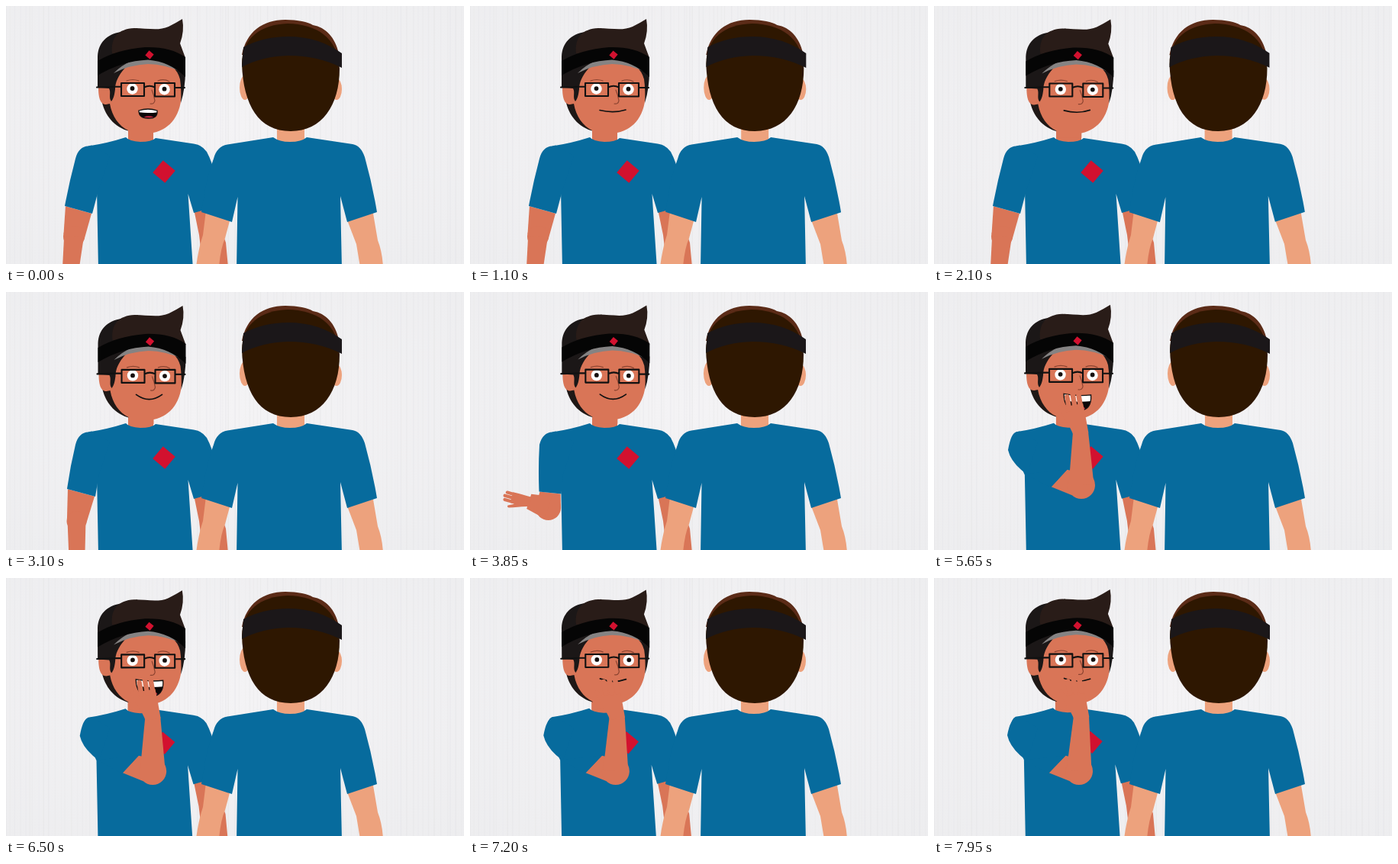
An HTML page for the animation above (8000 ms loop, 600 by 338 pixels).

```html
<!DOCTYPE html>
<html lang="en">
<head>
<meta charset="utf-8">
<title>Two colleagues</title>
<style>
  html, body { margin: 0; width: 100%; height: 100%; overflow: hidden; background: #f0eff1; }
  svg { display: block; width: 100vw; height: 100vh; }
  .shirt { fill: #076b9d; }
  .skin { fill: #d97557; }
  .pale { fill: #eda27d; }
  .line { fill: none; stroke: #111; stroke-linecap: round; }
</style>
</head>
<body>
<svg viewBox="0 0 600 338" preserveAspectRatio="none">
  <defs>
    <radialGradient id="light" cx=".5" cy=".45" r=".75">
      <stop offset="0" stop-color="#f4f3f5"/>
      <stop offset="1" stop-color="#ededef"/>
    </radialGradient>
    <clipPath id="mouthClip"><path id="mouthEdge"/></clipPath>
  </defs>
  <rect width="600" height="338" fill="url(#light)"/>
  <g id="stripes" fill="#d9d9dc"></g>

  <g id="body">
    <path class="skin" d="M246 266L253 300L258 342H291L288 310L271 262Z"/>
    <path class="skin" d="M160 140H193V182H160Z"/>
    <path class="shirt" d="M157 172Q161 177 176 178Q191 178 196 173L246 180.500Q257 182 263 191Q270 204 274 222L278 262L246 271L238.500 246L245 345H121L119 240L101 200Q102 186 108 183.500Q132 180 157 172Z"/>
    <rect x="-10.500" y="-10.500" width="21" height="21" fill="#d2112f" transform="translate(207 217) rotate(40)"/>
  </g>

  <g id="head">
    <path fill="#1f1816" d="M122 108L126 127C131 146 144 161 166 165L175 100Z"/>
    <path class="skin" d="M121 106C121 119 123 129 131 129L136 128C139 145 148 157 160 163V172H193V166C216 161 230 142 230 112L233 84L190 70L140 80L136 106Z"/>
    <path fill="#1b1717" d="M120 66C121 48 132 37 150 34L172 29L190 60L156 81C147 91 143 100 143 109C142 117 141 121 138 125C134 120 138 113 135 108L120 107L120 86Z"/>
    <path fill="#1b1717" d="M218 77L235 84Q235 108 229 127Q230 110 228 96Q225 85 218 80Z"/>
    <path fill="#291c18" d="M139 62C137 41 147 30 168 29C185 29 200 33 213 27Q223 22 231 17Q234 33 228 49L235 68Z"/>
    <path fill="#858383" d="M141 88Q162 67 190 67Q216 69 234 88Q208 76 186 76Q162 77 141 88Z"/>
    <path fill="#050505" d="M120 72Q145 57 182 54Q215 53 235 67L235 93Q215 73 186 70.500Q152 72 120 91Z"/>
    <rect x="-4" y="-4" width="8" height="8" fill="#d2112f" transform="translate(188 64) rotate(40)"/>
    <g class="line" style="stroke:#8c4431" stroke-width="1.200">
      <path d="M158 98Q166 95 174 98M199 98Q207 95 214 99M191 110Q194 117 195 124Q194 129 189 128"/>
    </g>
    <g fill="#fff"><circle cx="165.500" cy="108.500" r="7.200"/><circle cx="207.500" cy="109.200" r="7.200"/></g>
    <g id="pupils" fill="#160f0e"><circle cx="165.500" cy="108.500" r="2.900"/><circle cx="207.500" cy="109.200" r="2.900"/></g>
    <g class="line" stroke-width="2.100" stroke-linejoin="round">
      <path d="M119 106.500L151 105.500M151 101H181V118H151ZM195 101H221V118.500H195ZM181 106.500Q188 103 195 106.500M221 107L234 107"/>
    </g>
    <path id="smile" class="line" stroke-width="1.700"/>
    <g id="open">
      <g clip-path="url(#mouthClip)">
        <rect x="165" y="128" width="45" height="32" fill="#0c0708"/>
        <path id="teeth" fill="#fff"/>
        <ellipse id="tongue" cx="187" fill="#b5233c"/>
      </g>
      <path id="rim" class="line" stroke-width="1.300"/>
    </g>
  </g>

  <g id="arm">
    <path id="upper" class="skin"/>
    <circle id="elbow" class="skin"/>
    <path id="fore" class="skin"/>
    <g id="hand">
      <path class="skin" d="M-10 3C-12 -9 -19 -22 -23 -36Q-23 -40 -19 -39L-13 -27L-12.500 -36H9.500C10 -22 10 -9 10 3Z"/>
      <path d="M-9.500 -32V-48M-1.700 -32V-50M5.800 -32V-47" fill="none" stroke="#d97557" stroke-width="6.500" stroke-linecap="round"/>
    </g>
    <path id="sleeve" class="shirt"/>
  </g>

  <g id="mate">
    <path class="pale" d="M262 268L258 300Q252 318 249 342H279Q281 318 287 304L294 278Z"/>
    <path class="pale" d="M446 278L459 312L464 342H494Q493 322 487 307L480 266Z"/>
    <path class="pale" d="M355 150H391V184H355Z"/>
    <path class="shirt" d="M350 172Q358 178 372 178Q387 178 394 172L454 181Q465 183 470 198Q480 234 486 270L447 283L438 249L440 345H302L303.500 250L296 283L256 270Q262 226 272 200Q276 184 290 181.500Z"/>
    <ellipse class="pale" cx="313" cy="107" rx="7" ry="16"/>
    <ellipse class="pale" cx="433" cy="109" rx="7" ry="14"/>
    <path fill="#5b2b17" d="M309 64C315 34 336 18 366 18C382 18 396 21 402 25C419 28 431 41 436 62Z"/>
    <path fill="#2e1701" d="M309 76C309 42 334 24 369 23C406 24 435 40 437 82C437 130 414 164 373 164C331 164 311 130 309 76Z"/>
    <path fill="#1b1719" d="M311 54Q337 40 370 40Q409 40 440 62V81Q409 65 370 65Q335 66 309 80Z"/>
  </g>
</svg>
<script>
const $ = id => document.getElementById(id);
const LOOP = 8000;
const mix = (a, b, k) => a + (b - a) * k;
const ramp = (t, a, b) => {
  const k = Math.min(1, Math.max(0, (t - a) / (b - a)));
  return k * k * (3 - 2 * k);
};
const set = (id, attrs) => {
  for (const name in attrs) $(id).setAttribute(name, attrs[name]);
};

// shoulder, bend, cuff out, cuff in, elbow, wrist, elbow radius, hand turn, hand size
const rest = [91, 200, 83, 230, 77, 262, 113, 272, 89, 302, 83, 362, 14, -176, 1];
const tucked = [91, 200, 84, 229, 80, 258, 117, 268, 92.5, 300, 93, 362, 13, -176, 1];
const swing = [91, 200, 90, 230, 92, 262, 120, 264, 104, 280, 75, 262, 17, -60, .6];
const lift = [92, 202, 93, 230, 99, 262, 122, 261, 118, 274, 108, 215, 20, -25, .9];
const cheek = [92, 204, 92, 230, 99, 262, 123, 260, 124, 271, 147, 206, 22, 12, 1];
const cover = [97, 207, 103, 234, 153, 256, 175, 232, 193, 253, 192, 183, 18, -10, 1];
const settle = [96, 206, 102, 233, 150, 256, 173, 232, 190, 253, 193, 181, 18, -10, 1];
const moves = [[0, rest], [2700, rest], [3100, tucked], [3500, tucked], [3950, swing], [4300, lift],
  [4550, cheek], [4700, cheek], [5150, cover], [5700, cover], [LOOP, settle]];

function armAt(t) {
  let i = 1;
  while (i < moves.length - 1 && t > moves[i][0]) i++;
  const [t0, a] = moves[i - 1], [t1, b] = moves[i];
  const k = ramp(t, t0, t1);
  return a.map((v, n) => mix(v, b[n], k));
}

// Tapered limb between two points with the given half widths
function limb(x0, y0, w0, x1, y1, w1) {
  const d = Math.hypot(x1 - x0, y1 - y0) || 1;
  const nx = (y0 - y1) / d, ny = (x1 - x0) / d;
  return `M${x0 + nx * w0} ${y0 + ny * w0}L${x1 + nx * w1} ${y1 + ny * w1}` +
    `L${x1 - nx * w1} ${y1 - ny * w1}L${x0 - nx * w0} ${y0 - ny * w0}Z`;
}

function drawArm(t) {
  const [ax, ay, qx, qy, bx, by, cx, cy, ex, ey, wx, wy, r, turn, size] = armAt(t);
  const cuff = Math.hypot(cx - bx, cy - by);
  const ux = (cx - bx) / cuff, uy = (cy - by) / cuff;
  set('sleeve', { d: `M112 182.500L108 183.500Q${ax + 4} 184 ${ax} ${ay}Q${qx} ${qy} ${bx} ${by}L${cx} ${cy}L122 238L136 196Z` });
  set('upper', { d: `M${bx + ux} ${by + uy}L${cx - ux} ${cy - uy}L${ex + ux * r} ${ey + uy * r}L${ex - ux * r} ${ey - uy * r}Z` });
  set('elbow', { cx: ex, cy: ey, r });
  set('fore', { d: limb(ex, ey, r * .92, wx, wy, 10) });
  set('hand', { transform: `translate(${wx} ${wy}) rotate(${turn}) scale(${size})` });
}

function drawMouth(t) {
  const talk = t < 900, laugh = t >= 4200 && t < 7100;
  const gap = talk ? 3 + 9 * Math.abs(Math.cos(t * Math.PI / 300)) : 22;
  const open = laugh || talk;
  $('open').style.display = open ? '' : 'none';
  $('smile').style.display = open ? 'none' : '';
  if (open) {
    const d = laugh
      ? 'M170 133.500Q188 137 205.500 135Q207 156 188 156Q170 155 170 133.500Z'
      : `M174 137Q186 133 198 137Q199 ${136 + gap} 186 ${135 + gap}Q174 ${135 + gap} 174 137Z`;
    set('mouthEdge', { d });
    set('rim', { d });
    set('teeth', { d: laugh ? 'M168 132H207V143Q188 145 168 142Z' : 'M172 132H200V139Q186 141 172 139Z' });
    set('tongue', { cy: laugh ? 156 : 136 + gap, rx: laugh ? 12 : 8, ry: laugh ? 8 : 4 });
  } else {
    const k = ramp(t, 2000, 2600);
    set('smile', { d: t < 4200
      ? `M170 ${mix(136.5, 133.5, k)}Q${mix(188, 187, k)} ${mix(141, 146, k)} 204 ${mix(136, 133.5, k)}`
      : 'M170 133Q187 140 204 134' });
  }
}

function draw(t) {
  const dip = ramp(t, 900, 3000) * (1 - ramp(t, 3400, 4600));
  const rise = ramp(t, 5000, LOOP + 500);
  set('head', { transform: `translate(${.5 * dip + .9 * rise} ${.9 * dip - 1.7 * rise}) rotate(${-.5 * rise} 178 165)` });
  set('body', { transform: `translate(${-1.2 * rise} ${-1.8 * rise})` });
  const sway = .12 * Math.sin(t * Math.PI / 1350) * (1 - ramp(t, 2300, 3000));
  set('mate', { transform: `rotate(${sway} 372 338)` });
  set('pupils', { transform: `translate(${.8 * rise} ${-.5 * (1 - dip)})` });
  drawMouth(t);
  drawArm(t);
}

let seed = 7;
const rnd = () => (seed = seed * 16807 % 2147483647) / 2147483647;
let grain = '';
for (let x = 0; x < 600; x += 3 + rnd() * 6)
  grain += `<rect x="${x}" width="${.6 + rnd()}" height="338" opacity="${.08 + rnd() * .2}"/>`;
$('stripes').innerHTML = grain;

const start = performance.now();
function tick() {
  draw((performance.now() - start) % LOOP);
  requestAnimationFrame(tick);
}
tick();
</script>
</body>
</html>
```
